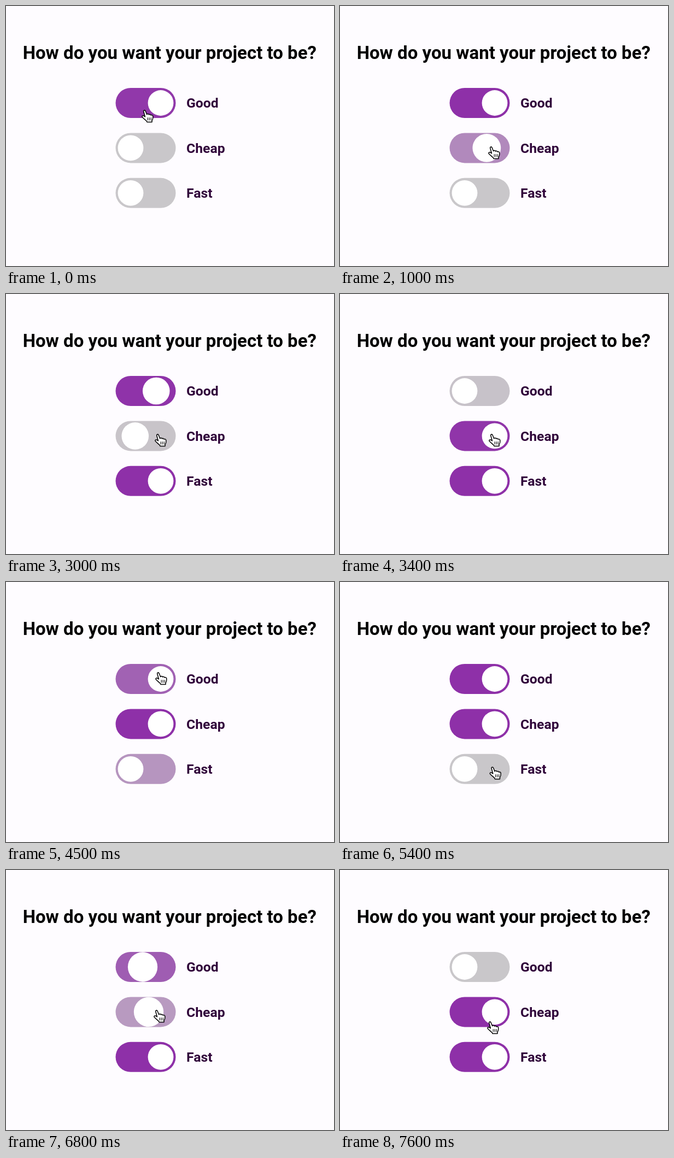
Recreate the animation shown at these times as an HTML page. Size 600 by 476 pixels, loop 7800 ms.

```html
<!DOCTYPE html>
<html lang="en">
<head>
<meta charset="utf-8">
<title>Pick two</title>
<style>
  html, body { margin: 0; width: 100%; height: 100%; overflow: hidden; background: #fefcff; }
  svg { display: block; width: 100%; height: 100%; }
  text { font: bold 24.75px Roboto, sans-serif; fill: #30053a; }
  .title { font-size: 33px; fill: #000; text-anchor: middle; }
</style>
</head>
<body>
<svg viewBox="0 0 600 476">
  <text class="title" x="299.3" y="96.5">How do you want your project to be?</text>
  <g id="rows"></g>
  <g id="hand" stroke="#000" stroke-linejoin="round" stroke-linecap="round">
    <path id="palm" d="M-2.3 2C-2.8-.2 .2-1 1.1 1.2L3.6 7.5C4.5 6 7 6 7.6 8C8.6 6.9 10.6 7.2 11.1 9C12.5 8 14.6 9 14.8 11C15.2 14 14.2 17 13 19V21.6H4L3.5 20C1 17.4-2 15.4-4.6 12.6C-6.2 10.4-3.6 8.9-1.5 10.4L.4 11.8Z" fill="#fff" stroke-width="1.5"/>
    <path d="M5.2 13.5V18M8.2 13.5V18M11.2 13.5V18" fill="none" stroke-width="1.1"/>
  </g>
</svg>
<script>
const LOOP = 7800, STEP = 100, SLIDE = 300, FADE = 500;
const GRAY = [201, 199, 202], PURPLE = [142, 48, 168];
const GOOD = 0, CHEAP = 1, FAST = 2;

// time, row switched on, row switched off
const clicks = [
  [-430, GOOD], [780, CHEAP], [1710, FAST, CHEAP], [2955, CHEAP, GOOD],
  [4192, GOOD, FAST], [5580, FAST, CHEAP], [6620, CHEAP, GOOD]
];

// start, end, x, y, sideways bulge, vertical bulge
const start = [254, 191];
const moves = [
  [50, 500, 277, 258, 0, 0],
  [1100, 1580, 279, 340, 46, 0],
  [2120, 2750, 278, 257, 46, 0],
  [3480, 3850, 279, 166, 0, 0],
  [3930, 4180, 279, 166, 28, -44],
  [4580, 5500, 273, 345, 49, 0],
  [6050, 6600, 276, 257, 50, 0],
  [7120, 7450, 275, 278, 0, 0]
];

const clamp = p => Math.min(1, Math.max(0, p));
const ease = p => p * p * (3 - 2 * p);
const mix = (a, b, p) => a + (b - a) * p;

function add(parent, tag, attrs) {
  const el = document.createElementNS("http://www.w3.org/2000/svg", tag);
  for (const key in attrs) el.setAttribute(key, attrs[key]);
  return parent.appendChild(el);
}

const rowGroup = document.getElementById("rows");
const hand = document.getElementById("hand");
const rows = ["Good", "Cheap", "Fast"].map((label, i) => {
  const y = 150 + i * 82.4;
  const track = add(rowGroup, "rect", { x: 200.5, y, width: 110, height: 55, rx: 27.5 });
  const knob = add(rowGroup, "circle", { cy: y + 27.5, fill: "#fff" });
  add(rowGroup, "text", { x: 330, y: y + 36.2 }).textContent = label;
  return { track, knob };
});

function drawRow({ track, knob }, i, t) {
  let on = false, since = -LOOP;
  for (const [time, onRow, offRow] of clicks) {
    if (time <= t && (onRow === i || offRow === i)) {
      on = onRow === i;
      since = time;
    }
  }
  const slide = clamp((t - since) / SLIDE);
  const fade = ease(clamp((t - since) / FADE));
  const tint = on ? fade : 1 - fade;
  const scale = 1.2 - 0.4 * Math.abs(slide - 0.5);
  knob.setAttribute("cx", mix(228, 283, on ? slide : 1 - slide));
  knob.setAttribute("r", 23.4 * scale);
  track.setAttribute("fill", `rgb(${GRAY.map((c, k) => Math.round(mix(c, PURPLE[k], tint)))})`);
}

function handAt(t) {
  let [x, y] = start;
  for (const [from, to, toX, toY, bulgeX, bulgeY] of moves) {
    if (t <= from) break;
    const p = ease(clamp((t - from) / (to - from)));
    const arc = 4 * p * (1 - p);
    x = mix(x, toX, p) + bulgeX * arc;
    y = mix(y, toY, p) + bulgeY * arc;
  }
  return [x, y];
}

function draw(now) {
  const t = Math.floor((now % LOOP) / STEP) * STEP;
  rows.forEach((row, i) => drawRow(row, i, t));
  hand.setAttribute("transform", `translate(${handAt(t)})`);
  requestAnimationFrame(draw);
}

const begin = performance.now();
draw(0);
function draw0() {}
</script>
</body>
</html>
```
